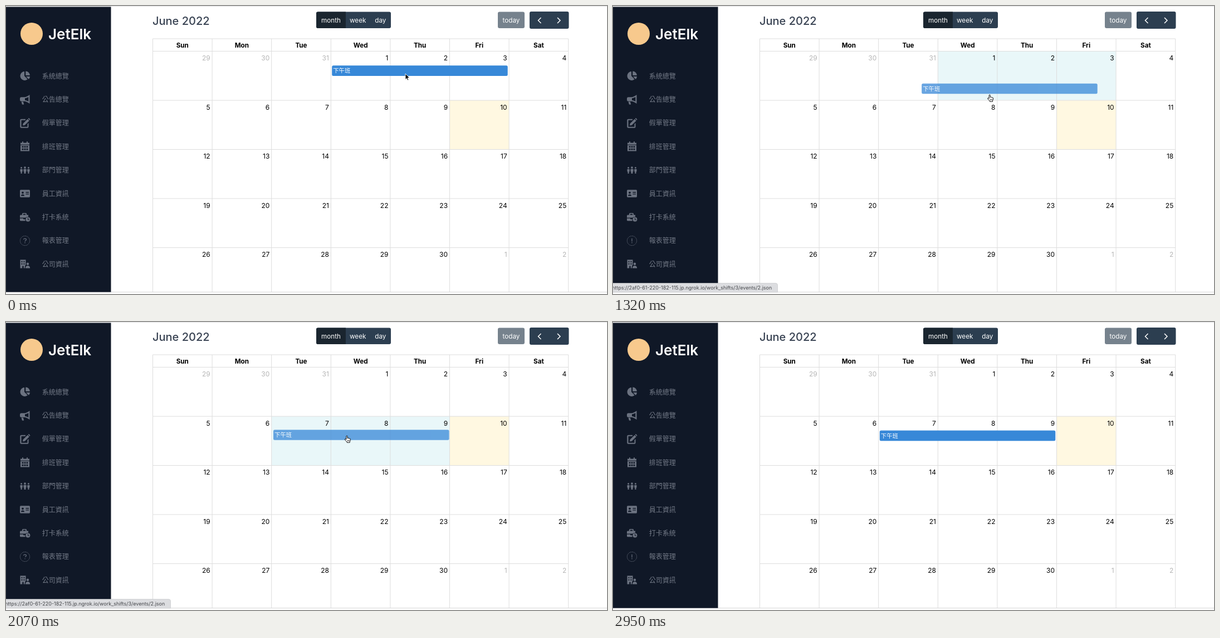
Recreate the animation shown at these times as an HTML page. Size 1079x519 px, loop 3.2 s.

```html
<!DOCTYPE html>
<html lang="zh-Hant">
<head>
<meta charset="utf-8">
<title>Shift calendar</title>
<style>
html, body { margin: 0; width: 100%; height: 100%; overflow: hidden; background: #fff; }
svg { display: block; width: 1079px; height: 519px; font-family: Inter, "Noto Sans CJK TC", "Noto Sans CJK", sans-serif; }
.ico { fill: #6b7280; fill-rule: evenodd; }
.line { fill: none; stroke: #6b7280; }
.btn { fill: #fff; font-size: 11.7px; text-anchor: middle; }
</style>
</head>
<body>
<svg viewBox="0 0 1079 519" id="stage">
  <rect width="1079" height="519" fill="#fff"/>
  <rect width="1079" height="1" fill="#e2e2e4"/>
  <rect y="515" width="1079" height="1" fill="#d6d6d8"/>
  <rect y="1.5" width="188.5" height="514" fill="#101827"/>
  <circle cx="46" cy="50" r="20" fill="#f7c98d"/>
  <text x="76" y="60" font-size="26" font-weight="600" fill="#fff">JetElk</text>
  <g id="menu"></g>
  <g id="badge" class="line" stroke-linecap="round">
    <circle cx="34" cy="423" r="8.6" stroke-width="1" stroke-dasharray="1.5 1.2" stroke-linecap="butt"/>
    <path id="mark" pathLength="1" stroke-width="1.2" stroke-linecap="butt"/>
    <circle id="dot" cx="34" cy="426.6" r=".8" fill="#6b7280" stroke="none"/>
  </g>

  <text x="263" y="33.5" font-size="20" font-weight="500" fill="#374151">June 2022</text>
  <rect x="557" y="10.5" width="134" height="29.5" rx="3" fill="#2c3e50"/>
  <path d="M610 10.5H560a3 3 0 0 0-3 3V37a3 3 0 0 0 3 3H610Z" fill="#1a252f"/>
  <rect x="883" y="10.5" width="48" height="29.5" rx="3" fill="#76828d"/>
  <rect x="940" y="10" width="70.5" height="31" rx="3" fill="#2c3e50"/>
  <g class="btn">
    <text x="583.5" y="30">month</text><text x="631.7" y="30">week</text>
    <text x="672.3" y="30">day</text><text x="907" y="30">today</text>
  </g>
  <path d="M960.5 21l-5 5 5 5M990 21l5 5-5 5" fill="none" stroke="#fff" stroke-width="1.5"/>

  <g id="cells"></g>
  <rect id="glow" width="319.6" height="88" fill="#e9f7f9"/>
  <path id="grid" fill="none" stroke="#ddd"/>
  <g id="days" font-size="12"></g>

  <g id="shift">
    <rect width="315.5" height="18.6" rx="2.5" fill="#3788d8"/>
    <text x="2" y="13.2" font-size="10.4" fill="#fff">下午班</text>
  </g>
  <g id="status">
    <path id="bubble" fill="#dcdde0" stroke="#c6c7ca" stroke-width=".7"/>
    <text x="-2" y="510.6" font-size="9" fill="#45474b">https://2af0-61-220-182-115.jp.ngrok.io/work_shifts/3/events/2.json</text>
  </g>
  <path id="arrow" d="M0 0V10.6L2.4 8.4 4 12.1 5.8 11.3 4.2 7.7 7.5 7.5Z" fill="#000" stroke="#fff" stroke-width=".9"/>
  <g id="hand" stroke="#000" stroke-width=".95" stroke-linejoin="round">
    <path d="M3.2 7.3V1.6a1 1 0 0 1 2.1 0V4.9Q6.4 4.2 7.2 5.1 8.2 4.6 8.9 5.6 10.4 5.2 10.5 6.7V8.6Q10.4 10 9.5 11.2V12.7H4.5V11.5Q2.4 10 .8 7.7 .2 6.4 1.2 6.2 2.3 6.2 3.2 7.3Z" fill="#fff"/>
    <path d="M5.4 8.2V10.6M7 8.2V10.6M8.6 8.2V10.6" fill="none" stroke-width=".7"/>
  </g>
</svg>
<script>
const $ = id => document.getElementById(id);
const LOOP = 3200, LEFT = 263.5, TOP = 81.5, COL = 106.6, ROW = 88.5;

// Sidebar: label and icon, drawn around the icon's centre
const block = (x, y, w, h) => `M${x} ${y}h${w}v${h}h${-w}Z`;
const disc = (x, y, r) => `M${x - r} ${y}a${r} ${r} 0 1 0 ${2 * r} 0a${r} ${r} 0 1 0 ${-2 * r} 0Z`;
const holes = [-5.5, -1.5, 2.5].map(x => block(x, -.7, 3, 2.6) + block(x, 3.6, 3, 2.6)).join('');
const person = (x, y, r) => disc(x, y, r) + `M${x - r - .6} ${y + r + .8}h${2 * r + 1.2}v4l-1 1.2v3h${-2 * r + .8}v-3l-1-1.2Z`;
const windows = [-6.5, -2.5].map(x => [-5.5, -1.5].map(y => block(x, y, 2, 2)).join('')).join('');
const menu = [
  ['系統總覽', 'M-1-8A8 8 0 1 0 4.8 6L-1 0ZM1.3-8.5A8 8 0 0 1 9-1H1.3ZM2 1H9A8 8 0 0 1 6.8 6Z'],
  ['公告總覽', 'M8.5-8.5V7.5Q3 3.5-1 3.3H-6.5Q-9 3.3-9 1V-2Q-9-4.2-6.5-4.2H-1Q3-4.5 8.5-8.5ZM6.3-4.5V3.5Q3 1.6 0 1.3V-2.2Q3-2.6 6.3-4.5ZM-6.5 4H-3L-1.8 9H-5Z'],
  ['假單管理', 'M1-7V-5H-6.5V7H4.5V2L6.5 0V7Q6.5 9 4.5 9H-6.5Q-8.7 9-8.7 7V-5Q-8.7-7-6.5-7ZM-4 4.5L-3.3 1 4.8-7 7.8-4-.3 4ZM5.6-7.8L7-9 9.5-6.3 8.5-5Z'],
  ['排班管理', block(-8, -6.8, 16, 3.4) + block(-8, -2.5, 16, 10.8) + holes + block(-5, -9, 2, 2.2) + block(3, -9, 2, 2.2)],
  ['部門管理', person(-6.4, -4, 1.5) + person(0, -4.5, 1.9) + person(6.4, -4, 1.5)],
  ['員工資訊', 'M-7.5-6.8H7.5Q9-6.8 9-5V5Q9 6.8 7.5 6.8H-7.5Q-9 6.8-9 5V-5Q-9-6.8-7.5-6.8Z' + disc(-4, -1.7, 1.9) + 'M-7 4.3Q-7 1.4-4 1.4T-1 4.3Z' + block(1.5, -3, 5.5, 1.4) + block(1.5, .2, 5.5, 1.4)],
  ['打卡系統', 'M-5-4V-6Q-5-7.5-3.5-7.5H1.5Q3-7.5 3-6V-4H6V-.6Q2.5-.3 1.2 1.2H-9V-2.5Q-9-4-7.5-4ZM-3.2-4H1.2V-5.8H-3.2ZM-9 2.3H-3V3.8H.4Q.2 5.4.8 6.8H-7.5Q-9 6.8-9 5.3Z' + disc(5.4, 4, 4) + 'M5 1.5H6V4H7.8V5H5Z'],
  ['報表管理', ''],
  ['公司資訊', 'M-8.5-8H1.5V1Q-.2 2.5-.2 7.3H-2.3V3.2H-4.7V7.3H-8.5Z' + windows + disc(5, -.5, 2.2) + 'M.9 7.3Q.9 2.8 5 2.8T9.2 7.3Z'],
];
$('menu').innerHTML = menu.map(([label, icon], i) => {
  const y = 126 + i * 42.4;
  return `<path class="ico" transform="translate(34 ${y})" d="${icon}"/>` +
    `<text x="64.7" y="${y + 4.5}" font-size="12" fill="#727986">${label}</text>`;
}).join('');

// Month grid
let lines = `M${LEFT} 59H${LEFT + 7 * COL}`, days = '';
for (let c = 0; c <= 7; c++) lines += `M${LEFT + c * COL} 59V515`;
for (let r = 0; r < 5; r++) lines += `M${LEFT} ${TOP + r * ROW}h${7 * COL}`;
$('grid').setAttribute('d', lines);
$('cells').innerHTML = `<rect x="${LEFT + 5 * COL}" y="${TOP + ROW}" width="${COL}" height="${ROW}" fill="#fff8e1"/>`;
['Sun', 'Mon', 'Tue', 'Wed', 'Thu', 'Fri', 'Sat'].forEach((name, c) => {
  days += `<text x="${LEFT + (c + .5) * COL}" y="74.7" font-size="11.7" font-weight="700" text-anchor="middle">${name}</text>`;
});
for (let i = 0; i < 35; i++) {
  const n = i - 2, inside = n > 0 && n < 31;
  const x = LEFT + (i % 7 + 1) * COL - 3.4, y = TOP + Math.floor(i / 7) * ROW + 16.7;
  days += `<text x="${x}" y="${y}" text-anchor="end" fill="${inside ? '#000' : '#b5b5b5'}">${n < 1 ? n + 31 : n > 30 ? n - 30 : n}</text>`;
}
$('days').innerHTML = days;

// Stepped tracks: [start ms, values...]
const pointer = [
  [0, 717, 122, 'arrow'], [150, 711.5, 125.5, 'hand'], [300, 708.5, 131.5, 'hand'],
  [590, 711.5, 121.5, 'hand'], [740, 714, 120.5, 'hand'], [890, 714, 119.5, 'hand'],
  [1030, 707.3, 127.7, 'hand'], [1170, 694, 140.5, 'hand'], [1320, 672, 159.5, 'hand'],
  [1470, 646, 181, 'hand'], [1620, 624, 199, 'hand'], [1770, 612, 203, 'hand'],
  [1920, 609, 204, 'hand'], [2070, 607.7, 204.5, 'hand'],
  [2360, 802.5, 284, 'arrow'], [2510, 984, 494, 'arrow'], [2660, 0, 0, ''],
];
const drag = [
  [0, 585.2, 107.3], [1170, 576, 120], [1320, 554.2, 139.7], [1470, 529.2, 160.4],
  [1620, 505.5, 179.3], [1770, 485.2, 190.6], [1920, 481.3, 192.8], [2070, 480, 194.2], [2220, 478.8, 195.6],
];
// glyph, drawn share of its stroke, dot opacity
const badge = [
  [0, '?', 1, 1], [150, '?', .9, 1], [450, '?', .5, .5], [590, '', 0, 0],
  [740, '!', .5, 0], [890, '!', .9, .6], [1030, '!', 1, 1], [1470, '!', .95, 1],
  [1620, '!', .5, .5], [1770, '', 0, 0], [1920, '?', .6, 0], [2070, '?', .9, .7],
  [2220, '?', 1, 1], [2360, '?', .6, .5], [2510, '', 0, 0],
  [2660, '!', .6, .4], [2810, '!', .9, .8], [2950, '!', 1, 1],
];
const glyphs = {
  '?': 'M31.6 420.9Q31.8 419 34 419 36.4 419.1 36.4 421 36.4 422 35.1 422.7 34 423.3 34 424.6',
  '!': 'M34 418.8V424.6',
  '': '',
};
const at = (track, t) => track.reduce((now, key) => key[0] <= t ? key : now);
const set = (id, attrs) => { for (const k in attrs) $(id).setAttribute(k, attrs[k]); };
const move = (x, y) => `translate(${x} ${y})`;

function draw(t) {
  const [, px, py, shape] = at(pointer, t);
  for (const id of ['arrow', 'hand'])
    set(id, { transform: move(px, py), visibility: id === shape ? 'visible' : 'hidden' });

  const dragging = t >= 1170 && t < 2220, moved = t >= 1470;
  const [, bx, by] = at(drag, t);
  set('shift', { transform: move(bx, by), opacity: dragging ? .75 : 1 });
  set('glow', {
    x: LEFT + (moved ? 2 : 3) * COL, y: TOP + (moved ? ROW : 0),
    visibility: dragging ? 'visible' : 'hidden',
  });

  const [, glyph, share, dot] = at(badge, t);
  set('mark', { d: glyphs[glyph], 'stroke-dasharray': `${share} 2` });
  set('dot', { opacity: dot });

  const edge = t < 2510 ? 296 : 360;
  set('bubble', { d: `M-2 499.5H${edge - 4}q3.5 0 3.5 3.5V516H-2Z` });
  set('status', { opacity: t < 1030 || t >= 2950 ? 0 : t < 2810 ? 1 : .5 });
}

function tick(now) {
  draw(now % LOOP);
  requestAnimationFrame(tick);
}
draw(0);
requestAnimationFrame(tick);
</script>
</body>
</html>
```
